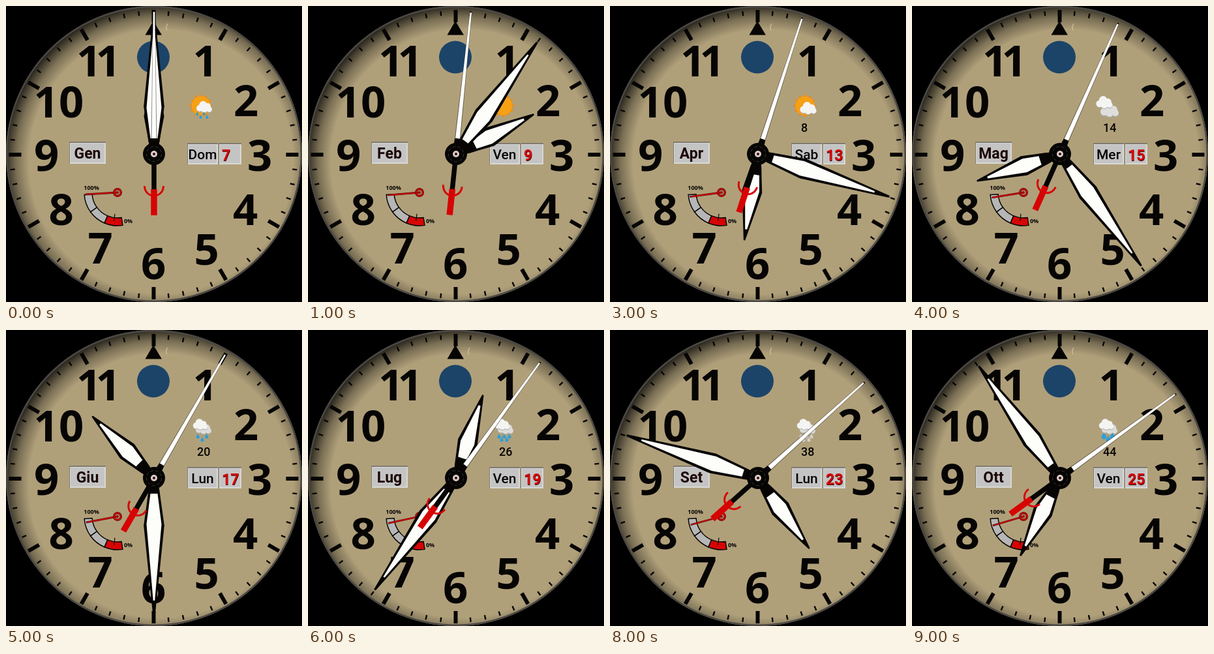
Write an HTML page with a canvas that moves like this. It is 454x454 px and loops after 10000 ms.

```html
<!DOCTYPE html>
<html lang="it">
<head>
<meta charset="utf-8">
<title>Orologio</title>
<style>
html, body { margin: 0; width: 100%; height: 100%; overflow: hidden; background: #000; }
canvas { display: block; }
</style>
</head>
<body>
<canvas id="stage" width="454" height="454"></canvas>
<script>
const ctx = document.getElementById('stage').getContext('2d');
const DEG = Math.PI / 180;
const INK = '#060504', FACE = '#b0a07a', RED = '#d60404';
const MONTHS = ['Gen', 'Feb', 'Mar', 'Apr', 'Mag', 'Giu', 'Lug', 'Ago', 'Set', 'Ott'];
const DAYS = ['Dom', 'Ven', 'Lun', 'Sab', 'Mer', 'Lun', 'Ven', 'Mer', 'Lun', 'Ven'];

// digit, centre x, baseline
const NUMERALS = [
  ['1', 305.5, 108], ['2', 368, 169], ['3', 389, 252.5], ['4', 367, 336],
  ['5', 307.5, 396.5], ['6', 226, 419], ['7', 144.5, 395], ['8', 84.5, 335.5],
  ['9', 62, 252.5], ['1', 61.5, 170.5], ['0', 100, 170.5], ['1', 127, 108], ['1', 156.5, 108]
];

function disc(x, y, r, fill) {
  ctx.beginPath();
  ctx.arc(x, y, r, 0, 2 * Math.PI);
  ctx.fillStyle = fill;
  ctx.fill();
}

function ring(x, y, r, color, width) {
  ctx.beginPath();
  ctx.arc(x, y, r, 0, 2 * Math.PI);
  ctx.strokeStyle = color;
  ctx.lineWidth = width;
  ctx.stroke();
}

function shape(points, fill) {
  ctx.beginPath();
  points.forEach(p => ctx.lineTo(p[0], p[1]));
  ctx.closePath();
  ctx.fillStyle = fill;
  ctx.fill();
}

function line(x1, y1, x2, y2, color, width) {
  ctx.beginPath();
  ctx.moveTo(x1, y1);
  ctx.lineTo(x2, y2);
  ctx.strokeStyle = color;
  ctx.lineWidth = width;
  ctx.stroke();
}

function text(value, x, y, font, fill = INK, align = 'center') {
  ctx.font = font;
  ctx.textAlign = align;
  ctx.fillStyle = fill;
  ctx.fillText(value, x, y);
}

function rotated(x, y, degrees, draw) {
  ctx.save();
  ctx.translate(x, y);
  ctx.rotate(degrees * DEG);
  draw();
  ctx.restore();
}

// Symmetric blade pointing up, given as [radius, half width] pairs.
function blade(profile, fill) {
  const right = profile.map(([r, w]) => [w, -r]);
  const left = profile.map(([r, w]) => [-w, -r]).reverse();
  shape(right.concat(left), fill);
}

function drawDial() {
  ctx.fillStyle = '#000';
  ctx.fillRect(0, 0, 454, 454);
  disc(227, 227, 227, FACE);
  const shade = ctx.createRadialGradient(238, 239, 0, 238, 239, 244);
  shade.addColorStop(0.83, 'rgba(0,0,0,0)');
  shade.addColorStop(0.91, 'rgba(0,0,0,.3)');
  shade.addColorStop(1, 'rgba(0,0,0,.85)');
  disc(227, 227, 227, shade);
  ring(227, 227, 225.8, '#4a4845', 2.4);

  for (let i = 0; i < 60; i++) {
    rotated(226.5, 228, i * 6, () => {
      if (i % 5) line(0, -214, 0, -221, INK, 2.4);
      else line(0, -203, 0, -222, INK, 6);
    });
  }
  NUMERALS.forEach(([digit, x, y]) =>
    text(digit, x, y, '700 67px "Open Sans", "Noto Sans", sans-serif'));
  shape([[226, 23], [239, 44.5], [213.5, 44.5]], INK);
  disc(226, 78.5, 25, '#1c4468');
  ctx.beginPath();
  ctx.moveTo(248, 27);
  ctx.quadraticCurveTo(244, 33, 247, 37);
  ctx.strokeStyle = '#d0c094';
  ctx.lineWidth = 1.3;
  ctx.stroke();
}

function drawBox(x, y, w, h) {
  ctx.fillStyle = '#807b70';
  ctx.fillRect(x, y, w, h);
  ctx.fillStyle = '#d8d8d6';
  ctx.fillRect(x + 1, y + 2, w - 1, h - 2);
  ctx.fillStyle = '#c4c4c4';
  ctx.fillRect(x + 2, y + 3, w - 4, h - 5);
}

function drawDate(step) {
  drawBox(97, 208, 56, 34);
  drawBox(278, 210, 47, 33);
  drawBox(326, 210, 35, 33);
  text(MONTHS[step], 125, 234, '700 23px Roboto, sans-serif', '#1c0606');
  text(DAYS[step], 301.5, 235, '500 21px Roboto, sans-serif');
  const day = 7 + 2 * step;
  const font = '700 23px Roboto, sans-serif';
  text(day, 331.5, 237.5, font, '#300', 'left');
  text(day, 331, 237, font, RED, 'left');
}

function drawGauge(step) {
  const x = 171, y = 286;
  const band = (from, to, fill) => {
    ctx.beginPath();
    ctx.arc(x, y, 51, Math.PI - from * DEG, Math.PI - to * DEG, true);
    ctx.arc(x, y, 39, Math.PI - to * DEG, Math.PI - from * DEG);
    ctx.closePath();
    ctx.fillStyle = fill;
    ctx.fill();
    ctx.strokeStyle = INK;
    ctx.lineWidth = 1.5;
    ctx.stroke();
  };
  band(4, 36, '#b6b6b6');
  band(36, 67, '#b6b6b6');
  band(67, 99, RED);
  rotated(x, y, -83, () => line(-33, 0, -44, 0, INK, 1.2));
  const font = '700 9px "Open Sans", "Noto Sans", sans-serif';
  text('100%', 131, 282.3, font);
  text('0%', 187.5, 333, font);
  rotated(x, y, -(3.5 + 1.45 * step), () => {
    line(-49, 0, 0, 0, '#5a0808', 2.8);
    line(-48, 0, 0, 0, '#c80808', 1.8);
  });
  ring(x, y, 5.3, '#5a0808', 3.4);
  ring(x, y, 5.3, '#c80808', 2);
  disc(x, y, 2, '#900');
}

function drawSun(x, y, r) {
  for (let i = 0; i < 12; i++) {
    rotated(x, y, i * 30, () => shape([[-4, -r * 0.7], [0, -r], [4, -r * 0.7]], '#f08a10'));
  }
  disc(x, y, r * 0.8, '#f6a016');
}

function drawCloud(x, y, scale = 1, tint = '#f4f4f2') {
  ctx.save();
  ctx.translate(x, y);
  ctx.scale(scale, scale);
  [[1.2, '#a9a9a6'], [0, tint]].forEach(([drop, fill]) => {
    disc(-8, 2 + drop, 6, fill);
    disc(-2, -4 + drop, 7, fill);
    disc(6, -1 + drop, 6, fill);
    disc(9, 4 + drop, 5, fill);
    disc(0, 4 + drop, 6, fill);
  });
  ctx.restore();
}

function drawDrops(y, count, r, fill = '#2a9fda') {
  for (let i = 0; i < count; i++) {
    const cx = 301 + (i - (count - 1) / 2) * 20 / count;
    const cy = y + (i % 2) * 5;
    shape([[cx - r, cy], [cx, cy - r * 2], [cx + r, cy]], fill);
    disc(cx, cy, r, fill);
  }
}

function drawWeather(step) {
  if (step < 4) drawSun(299, 153, 18);
  if (step === 0) {
    drawCloud(304, 155, 0.85);
    drawDrops(166, 4, 2);
  } else if (step === 2 || step === 3) {
    drawCloud(304, 157, 0.9);
  } else if (step === 4) {
    drawCloud(303, 160, 1, '#dededc');
    drawCloud(295, 148, 0.9);
  } else if (step > 4) {
    const large = step === 9;
    drawDrops(164, large || step === 5 ? 3 : 5, large ? 3.6 : 2.5,
      step === 8 ? '#cfcfca' : undefined);
    drawCloud(303, 151, 0.85, '#dcdcda');
    drawCloud(298, 145, 0.8);
  }
  const degrees = 6 * step - 10;
  if (degrees >= 0) text(degrees, 293, 192.5, '500 18px Roboto, sans-serif', INK, 'left');
}

function drawHour() {
  blade([[10, 6], [20, 8.5], [34, 11], [58, 15.5], [134, 1.2]], INK);
  blade([[32, 7], [57, 11], [117, 1.5]], '#fdfdfa');
}

function drawMinute() {
  blade([[10, 7], [20, 8.5], [73, 15.8], [212, 1.5]], INK);
  blade([[24, 5.5], [71, 11.5], [188, 1.2]], '#fdfdfa');
}

function drawSecond() {
  blade([[14, 5], [25, 4.5], [219, 1.6]], 'rgba(40,38,34,.55)');
  blade([[14, 5], [24, 4]], INK);
  blade([[24, 3.4], [218, 1.2]], '#fff');
  line(0, 10, 0, 55, INK, 7.5);
  line(0, 54, 0, 94, RED, 9.5);
  ctx.beginPath();
  ctx.moveTo(-14.5, 49);
  ctx.bezierCurveTo(-14, 69, 14, 69, 14.5, 49);
  ctx.strokeStyle = RED;
  ctx.lineWidth = 3;
  ctx.stroke();
}

function drawHub() {
  disc(227, 227, 17, INK);
  ctx.setLineDash([5, 3]);
  ring(227, 227, 11.5, '#393532', 1);
  ctx.setLineDash([]);
  disc(227, 227, 5, '#dccbc8');
  disc(227, 227, 2, '#321010');
}

function frame(now) {
  const step = Math.floor(now / 1000) % 10;
  drawDial();
  drawDate(step);
  drawWeather(step);
  drawGauge(step);
  // Each step advances the clock by 2 h 6 min 1 s.
  rotated(227, 227, step * 63, drawHour);
  rotated(227, 227, step * 36, drawMinute);
  rotated(227, 227, step * 6, drawSecond);
  drawHub();
}

const start = performance.now();
function tick() {
  frame(performance.now() - start);
  requestAnimationFrame(tick);
}
tick();
</script>
</body>
</html>
```
